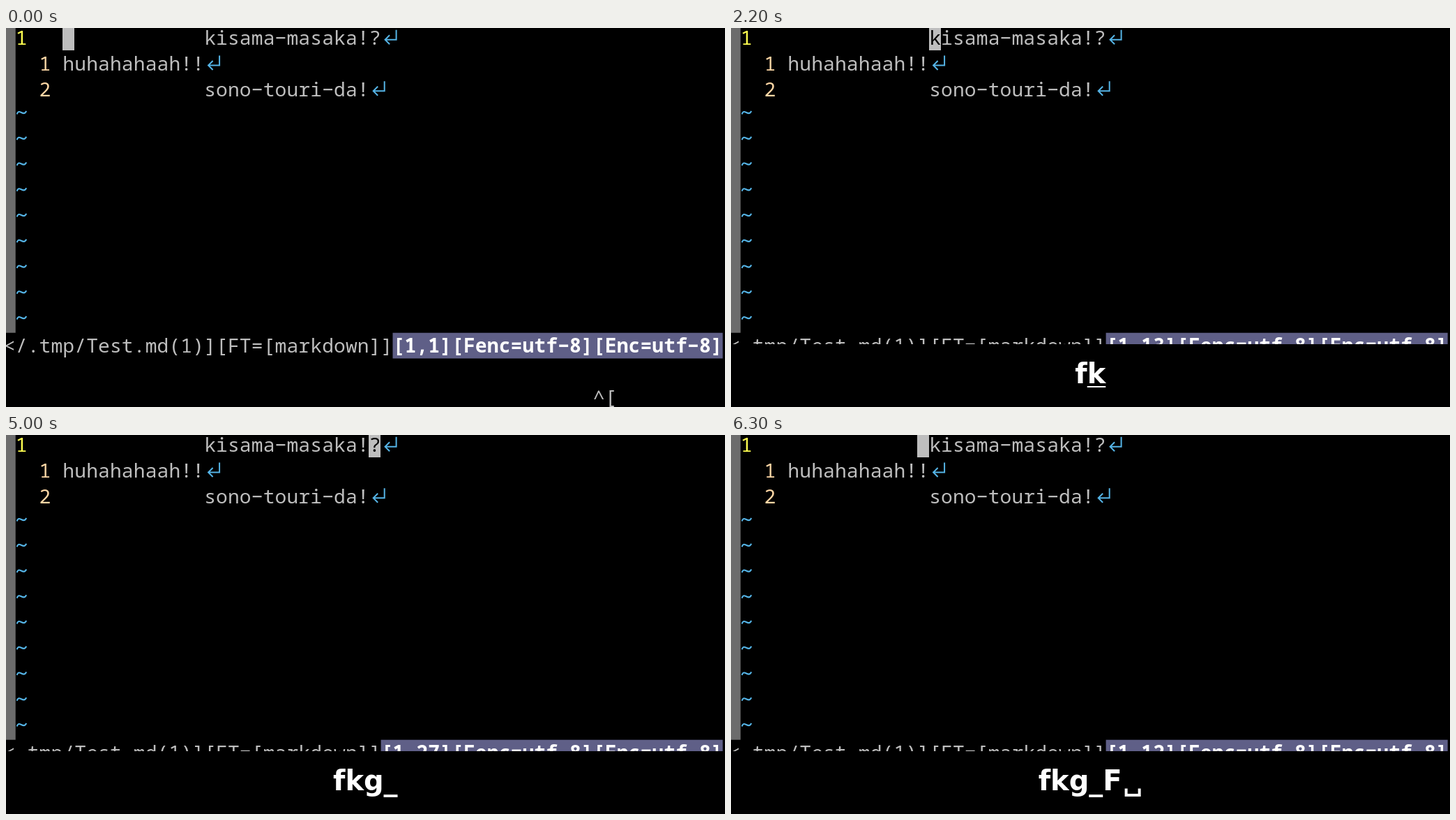
Recreate the animation shown at these times as an HTML page with a canvas. Size 1031 px wide and 543 px high, loop 8000 ms.

```html
<!DOCTYPE html>
<html lang="en">
<head>
<meta charset="utf-8">
<title>Editor key demo</title>
<style>
  html, body { margin: 0; width: 100%; height: 100%; overflow: hidden; background: #000; }
  canvas { display: block; width: 1031px; height: 543px; }
</style>
</head>
<body>
<canvas id="stage" width="1031" height="543"></canvas>
<script>
const ctx = document.getElementById('stage').getContext('2d');
const LOOP = 8000;
const CELL = 16.9, LEFT = -3.2, ROW = 36.75, TOP = -4.3, BASE = 28.6;
const MONO = '28px "Noto Sans Mono", monospace';
const KEYS = 'bold 40px "DejaVu Sans", sans-serif';
const GREY = '#bebebe', BLUE = '#55b4e6', RED = '#ff4040', WHITE = '#fff';
const LINE = 'kisama-masaka!?';

// marks: x = highlighted character, o = plain; line: duration of the key underline
const steps = [
  { at: 0, keys: '', cursor: 5, pos: '1,1', cmd: '^[' },
  { at: 1000, keys: 'f', block: 6, marks: 'xxxxxoxooooooxx', pos: '1,1', line: 200 },
  { at: 2200, keys: 'fk', cursor: 17, pos: '1,13', line: 200 },
  { at: 4600, keys: 'fkg', cursor: 17, pos: '1,13', cmd: 'g', line: 200 },
  { at: 4800, keys: 'fkg_', cursor: 31, pos: '1,27', line: 200 },
  { at: 5100, keys: 'fkg_F', block: 16, marks: 'oxooooxxoxoxxxo', pos: '1,27', line: 200 },
  { at: 6100, keys: 'fkg_F\u2423', cursor: 16, pos: '1,12', line: 200 }
];

const colX = col => LEFT + col * CELL;
const rowY = row => TOP + row * ROW;

function rect(color, x, y, w, h) {
  ctx.fillStyle = color;
  ctx.fillRect(x, y, w, h);
}

function cell(color, col) {
  const x = Math.floor(colX(col));
  rect(color, x, 0, Math.floor(colX(col + 1)) - x, 32);
}

function write(text, col, row, color = GREY, bold = false) {
  ctx.font = (bold ? 'bold ' : '') + MONO;
  ctx.textAlign = 'center';
  ctx.fillStyle = color;
  [...text].forEach((ch, i) =>
    ctx.fillText(ch === '-' ? '\u2212' : ch, colX(col + i + 0.5), rowY(row) + BASE));
}

function stroke(color, width, path) {
  ctx.strokeStyle = color;
  ctx.lineWidth = width;
  ctx.beginPath();
  path();
  ctx.stroke();
}

function lineEnd(col, row) {
  const x = colX(col), y = rowY(row);
  stroke(BLUE, 2, () => {
    ctx.moveTo(x + 22, y + 7);
    ctx.lineTo(x + 22, y + 21);
    ctx.lineTo(x + 6.5, y + 21);
    ctx.moveTo(x + 12.5, y + 14.5);
    ctx.lineTo(x + 6, y + 21);
    ctx.lineTo(x + 12.5, y + 27.5);
  });
}

function tilde(row) {
  const y = rowY(row) + 15;
  stroke(BLUE, 2.1, () => {
    ctx.moveTo(15.7, y + 2.5);
    ctx.bezierCurveTo(18.7, y - 7, 24.7, y + 7, 29.2, y - 2);
  });
}

function drawBuffer(step) {
  rect('#6c6c6c', 0, 0, colX(1), rowY(12));
  write('1', 1, 0, '#ffff50');
  write('1', 3, 1, '#ffd7a5');
  write('2', 3, 2, '#ffd7a5');
  if (step.block) cell(RED, step.block);
  if (step.cursor) cell(GREY, step.cursor);
  [...LINE].forEach((ch, i) => {
    const marked = step.marks && step.marks[i] === 'x';
    const under = step.cursor === 17 + i;
    write(ch, 17 + i, 0, under ? '#000' : marked ? RED : GREY, marked);
  });
  write('huhahahaah!!', 5, 1);
  write('sono-touri-da!', 17, 2);
  lineEnd(32, 0);
  lineEnd(17, 1);
  lineEnd(31, 2);
  for (let row = 3; row < 12; row++) tilde(row);
}

function drawStatus(step) {
  const info = `[${step.pos}][Fenc=utf-8][Enc=utf-8]`;
  const start = 61 - info.length;
  const path = '</.tmp/Test.md(1)][FT=[markdown]]';
  write('<' + path.slice(path.length - start + 1), 0, 12);
  rect('#5f5f87', colX(start), rowY(12), info.length * CELL, ROW);
  write(info, start, 12, WHITE, true);
}

function drawCommand(step) {
  if (step.cmd === '^[') write('^[', 50, 14);
  // only the lower bowl of the letter shows below the key panel
  if (step.cmd === 'g') stroke(GREY, 2, () => ctx.ellipse(850, 542.5, 6.3, 4.8, 0, 0, Math.PI * 2));
}

function drawKeys(step, underlined) {
  rect('#000', 0, 453, 1031, 84);
  ctx.font = KEYS;
  ctx.textAlign = 'left';
  const widths = [...step.keys].map(ch => ch === '\u2423' ? 29.3 : ctx.measureText(ch).width);
  let x = 515.3 - widths.reduce((a, b) => a + b, 0) / 2;
  [...step.keys].forEach((ch, i) => {
    if (ch === '\u2423') {
      stroke(WHITE, 4, () => {
        ctx.moveTo(x + 6, 506.5);
        ctx.lineTo(x + 6, 516);
        ctx.lineTo(x + 25, 516);
        ctx.lineTo(x + 25, 506.5);
      });
    } else {
      ctx.fillStyle = WHITE;
      ctx.fillText(ch, x, 509);
    }
    if (underlined && i === widths.length - 1) rect(WHITE, x, 513, widths[i], 2);
    x += widths[i];
  });
}

function frame() {
  const t = performance.now() % LOOP;
  const step = steps.filter(s => s.at <= t).pop();
  rect('#000', 0, 0, 1031, 543);
  drawBuffer(step);
  drawStatus(step);
  drawCommand(step);
  if (step.keys) drawKeys(step, t < step.at + step.line);
  requestAnimationFrame(frame);
}
frame();
</script>
</body>
</html>
```
